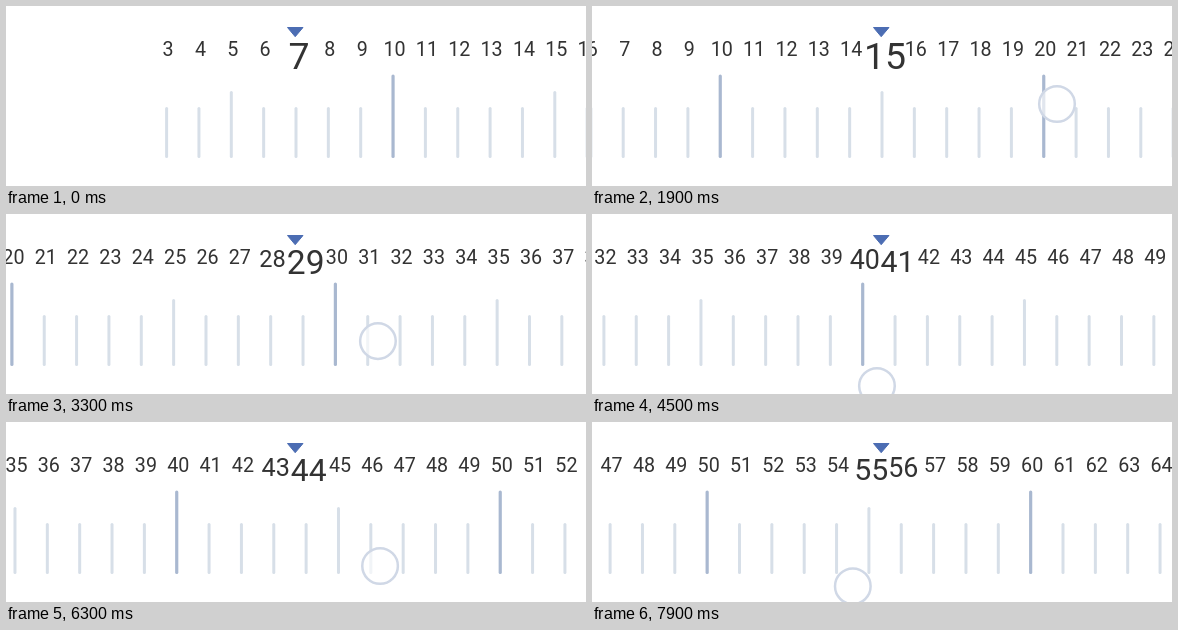
Recreate the animation shown at these times as an HTML page. Size 580 px wide and 180 px high, loop 8 s.

```html
<!DOCTYPE html>
<html lang="en">
<head>
<meta charset="utf-8">
<title>Ruler picker</title>
<style>
  html, body { margin: 0; width: 100%; height: 100%; overflow: hidden; background: #fff; }
  svg { display: block; width: 580px; height: 180px; }
  text { font: 19.7px Roboto, "Noto Sans", sans-serif; text-anchor: middle; fill: #333; }
  line { stroke: #d7dfe8; stroke-width: 3; stroke-linecap: round; }
  line.ten { stroke: #a9b8d0; stroke-width: 3.2; }
</style>
</head>
<body>
<svg viewBox="0 0 580 180">
  <g id="ruler"></g>
  <path d="M281.5 21.5H297L289.2 30.7Z" fill="#4c6db3" stroke="#4c6db3" stroke-linejoin="round"/>
  <circle id="touch" r="17.8" fill="#fff" fill-opacity=".65" stroke="#d0d8e6" stroke-width="2.5"/>
</svg>
<script>
const LOOP = 8000, STEP = 100, CENTER = 290, GAP = 32.35, FIRST = 3, LAST = 75;

// Swipes: start, end, value from, value to, finger x, finger y, downward slope
const swipes = [
  [1000, 1800,  7, 15, 465,    98, .4],
  [1900, 3000, 15, 25, 465,    98, .3],
  [3021, 3600, 25, 33, 494.3,  98, .238],
  [3800, 4733, 33, 42, 530.7,  98, .301],
  [4789, 5500, 42, 51, 490.5,  98, .457],
  [5800, 6558, 51, 41, 137.5, 180, .152],
  [6600, 7450, 41, 49, 465,    98, .35],
  [7500, 8120, 49, 58, 468,    98, .32]
];

const ruler = document.getElementById('ruler');
const touch = document.getElementById('touch');

function add(tag, attrs) {
  const node = document.createElementNS('http://www.w3.org/2000/svg', tag);
  for (const key in attrs) node.setAttribute(key, attrs[key]);
  return ruler.appendChild(node);
}

const marks = [];
for (let n = FIRST; n <= LAST; n++) {
  const ten = n % 10 === 0;
  const top = ten ? 70 : n % 5 === 0 ? 86.5 : 102.5;
  const tick = add('line', { y1: top, y2: 150.5, class: ten ? 'ten' : '' });
  const label = add('text', {});
  label.textContent = n;
  marks.push({ n, tick, label });
}

const smooth = u => u * u * (3 - 2 * u);

function draw(time) {
  const swipe = swipes.filter(s => s[0] <= time).pop() || swipes[0];
  const [start, end, from, to, x0, y0, slope] = swipe;
  const progress = Math.min(1, Math.max(0, (time - start) / (end - start)));
  const value = from + (to - from) * smooth(progress);

  for (const { n, tick, label } of marks) {
    const x = CENTER + (n - value) * GAP;
    const focus = Math.max(0, 1 - Math.abs(n - value));
    const scale = 1 + .9 * focus;
    tick.setAttribute('transform', `translate(${x} 0)`);
    label.setAttribute('transform',
      `translate(${x + 1.5 + 1.5 * focus} ${50 + 13 * focus}) scale(${scale})`);
  }

  const moved = (value - from) * GAP;
  touch.setAttribute('cx', x0 - moved);
  touch.setAttribute('cy', y0 + slope * moved);
  touch.style.display = time >= start && progress < .82 ? '' : 'none';
}

const origin = performance.now();
function frame() {
  const time = (performance.now() - origin) % LOOP;
  draw(Math.floor(time / STEP) * STEP);
  requestAnimationFrame(frame);
}
draw(0);
requestAnimationFrame(frame);
</script>
</body>
</html>
```
